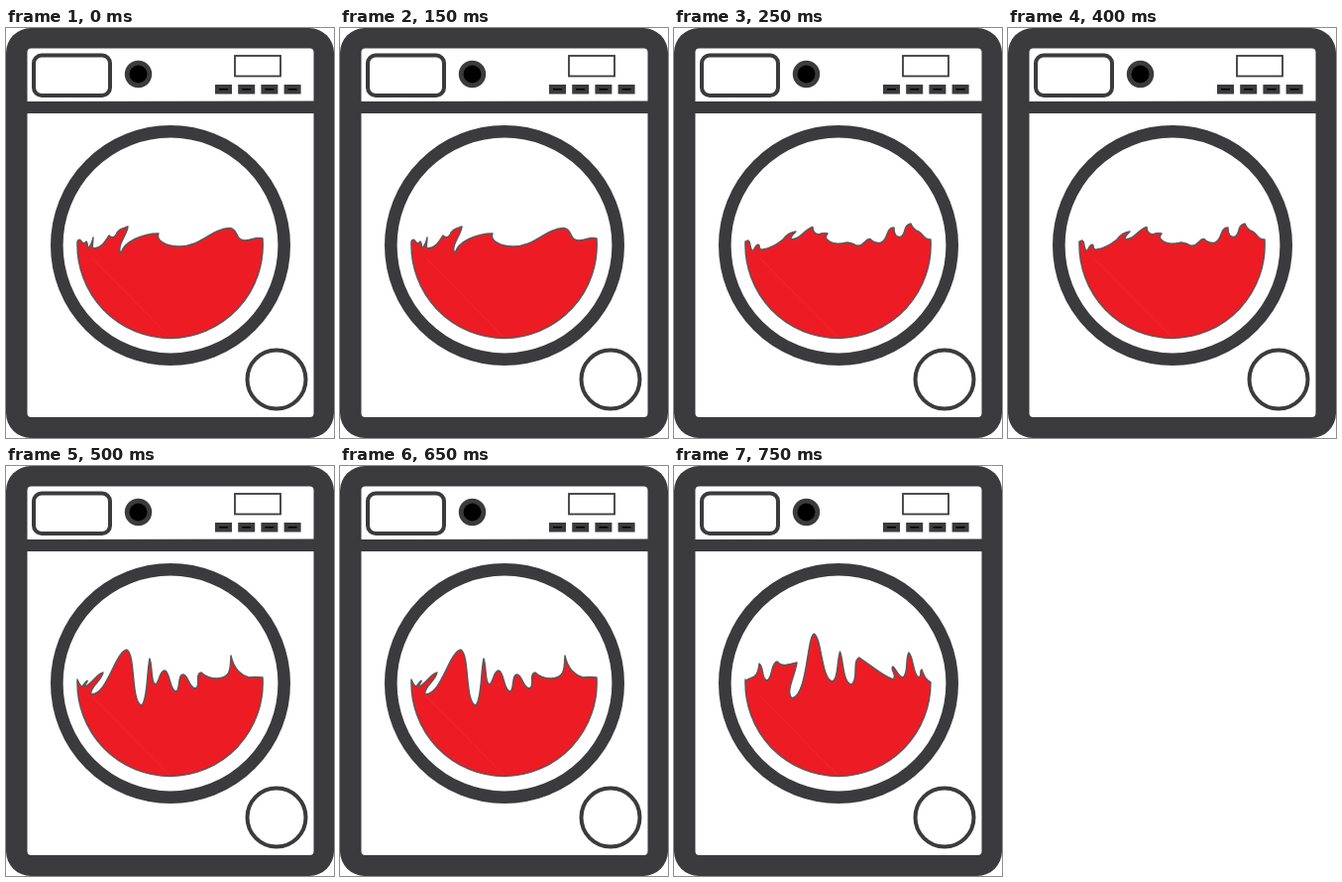
These frames come from a looping animation (331 by 413 pixels, 1 s). An HTML page:

```html
<!DOCTYPE html>
<html lang="en">
<head>
<meta charset="utf-8">
<title>Washing machine</title>
<style>
  html, body { margin: 0; width: 100%; height: 100%; overflow: hidden; background: #fff; }
  svg { display: block; width: 331px; height: 413px; }
  .dark { fill: #3b3b3d; }
  .line { fill: #fff; stroke: #3b3b3d; }
  .wash path { fill: #ed1c24; stroke: #58585a; stroke-width: 1.4; stroke-linejoin: round; opacity: 0; }
</style>
</head>
<body>
<svg viewBox="0 0 331 413">
  <rect class="dark" width="331" height="413" rx="25"/>
  <path fill="#fff" d="M21.500 74V24.500q0-4 4-4H306.500q4 0 4 4V73.500Z"/>
  <path fill="#fff" d="M21.500 86H310.500V388q0 4-4 4H25.500q-4 0-4-4Z"/>

  <rect class="line" x="28" y="27.500" width="77" height="40.500" rx="8" stroke-width="4"/>
  <circle class="dark" cx="133.500" cy="46.500" r="13.700"/>
  <circle cx="133.500" cy="46.500" r="9"/>
  <rect class="line" x="231" y="28" width="46" height="20.500" stroke-width="1.800"/>
  <g id="buttons"></g>

  <circle class="line" cx="166" cy="219" r="114.700" stroke-width="12.600"/>
  <circle class="line" cx="273" cy="354" r="29.500" stroke-width="4"/>
  <g class="wash" id="wash"></g>
  <path d="M87 232L165 311" stroke="#f0343a" stroke-width=".5"/>
</svg>
<script>
  const LOOP = 1000;
  const BOWL = "A94 94 0 0 1 166 312.5A94 94 0 0 1 72 215Z";

  // Water surface from left to right, one per pose.
  const surfaces = [
    `M72 215Q74 211 77 216Q79 218 81 215Q83 217 82 222Q86 220 88 211
     C88 217 86 222 89 222C96 222 100 215 104 209Q108 213 111 208
     C114 202 117 202 123 200C123 207 111 220 116 227
     C119 215 138 207 154 207C151 214 162 220 174 220
     C196 221 207 202 226 201.500C235 203 231 214 241 214C250 214 250 210 259 212`,
    `M72 216Q76 211 77 219Q78 225 80 224Q84 216 86 219Q86 224 90 223
     C101 221 106 216 110 213Q115 206 123 205Q116 212 119 213
     C129 212 131 203 140 200.500Q140 207 146 208Q150 206 155 207
     Q151 212 157 215C163 219 170 217 175 216Q181 217 184 219
     C192 221 192 212 198 212.500Q202 217 208 216.500C217 214 213 201 222 201
     Q222 211 228 210.500C235 209 230 199 239 197Q241 203 247 205C252 208 252 213 259 213`,
    `M72 215Q75 222 77 222Q83 214 82 217Q78 223 80 222
     C87 219 92 209 98 208C97 216 84 223 86 230
     C102 231 110 187 122 185C131 190 126 239 137 241
     C143 235 142 207 145 194C148 201 146 220 151 220
     C155 217 155 206 160 206C166 207 165 227 172 227
     C176 224 173 210 179 210C184 211 185 224 191 224C197 223 190 209 197 208
     Q203 214 213 214C228 213 226 203 227 191C230 205 237 210 245 213Q251 212 259 213`,
    `M72 217C77 211 84 217 86 199C91 202 88 215 94 216
     C100 213 97 199 104 197C109 203 115 200 124 198C123 209 112 228 119 234
     C135 231 134 171 141.500 169C149 173 149 216 160 217
     C166 214 164 199 167.500 187C171 194 170 218 179 220
     C187 215 179 197 187 193C199 201 210 211 221 215
     C226 211 217 204 221 202C225 206 226 212 231 213
     C237 209 233 194 237 188C242 193 241 210 247 213C251 211 247 207 250 205Q253 215 259 218`
  ];

  const add = (parent, name, attrs) => {
    const node = document.createElementNS("http://www.w3.org/2000/svg", name);
    for (const key in attrs) node.setAttribute(key, attrs[key]);
    return parent.appendChild(node);
  };

  const buttons = document.getElementById("buttons");
  for (let i = 0; i < 4; i++) {
    const x = 211 + i * 23.2;
    add(buttons, "rect", { class: "dark", x, y: 57, width: 17, height: 9.5 });
    add(buttons, "rect", { x: x + 4, y: 61, width: 9, height: 1.5 });
  }

  const wash = document.getElementById("wash");
  surfaces.forEach((surface, pose) => {
    const path = add(wash, "path", { d: surface + BOWL });
    const steps = [0, 1, 2, 3, 4].map(step => ({
      opacity: step % 4 === pose ? 1 : 0,
      offset: step / 4,
      easing: "step-end"
    }));
    path.animate(steps, { duration: LOOP, iterations: Infinity });
  });
</script>
</body>
</html>
```
